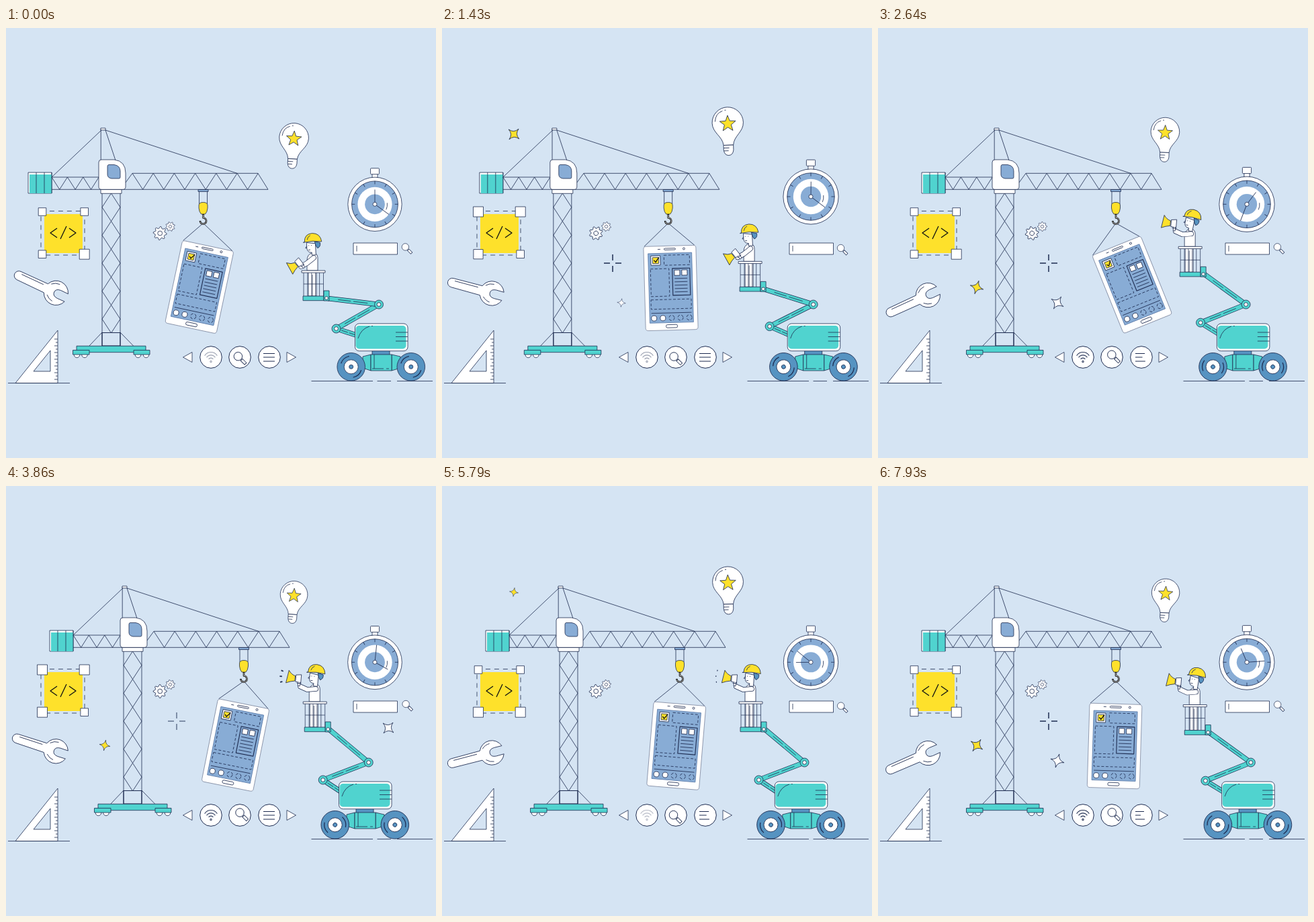
Recreate the animation shown at these times as an HTML page. Size 640 by 640 pixels, loop 8 s.

```html
<!DOCTYPE html>
<html lang="en">
<head>
<meta charset="utf-8">
<title>App construction</title>
<style>
html, body { margin: 0; width: 100%; height: 100%; overflow: hidden; background: #d5e4f3; }
svg { display: block; width: 100vw; height: 100vh; }
.l { fill: none; }
.w { fill: #fff; }
.y { fill: #fee12b; }
.t { fill: #50d3cf; }
.b { fill: #88acd5; }
.d { fill: #5693c1; }
.n { stroke: none; }
.dash { fill: none; stroke-dasharray: 4 2.6; }
</style>
</head>
<body>
<svg id="stage" viewBox="0 0 640 640" stroke="#1d2b50" stroke-width=".8" stroke-linejoin="round"></svg>
<script>
const LOOP = 8000, CYCLE = 5000;
const stage = document.getElementById('stage');

// ---- markup helpers ----
const path = (d, c = 'l', more = '') => `<path d="${d}" class="${c}" ${more}/>`;
const rect = (x, y, w, h, c = 'l', r = 0, more = '') =>
  `<rect x="${x}" y="${y}" width="${w}" height="${h}" rx="${r}" class="${c}" ${more}/>`;
const disc = (x, y, r, c = 'l', more = '') => `<circle cx="${x}" cy="${y}" r="${r}" class="${c}" ${more}/>`;
const group = (id, inner, more = '') => `<g id="${id}" ${more}>${inner}</g>`;
const range = (n, f) => Array.from({ length: n }, (_, i) => f(i));
const zigzag = (n, f) => 'M' + range(n, f).join('L');
const polar = (r, a) => [r * Math.sin(a), -r * Math.cos(a)].map(v => v.toFixed(2));

const gear = (r, inner, hole) => {
  const pts = range(32, i => polar(i % 4 < 2 ? r : inner, (i + (i % 2 ? -.15 : .15)) * Math.PI / 16));
  return path(`M${pts.join('L')}Z`, 'w') + disc(0, 0, hole, 'w');
};
const star = r => 'M' + range(10, i => polar(i % 2 ? r * .42 : r, i * Math.PI / 5)).join('L') + 'Z';
const SPARK = 'M0-10.5Q1-1 10.5 0Q1 1 0 10.5Q-1 1-10.5 0Q-1-1 0-10.5Z';

// ---- parts ----
const code = rect(57, 277, 57, 58, 'y n') +
  rect(52, 272.5, 65, 65.5, 'l', 0, 'stroke-dasharray="7 5.95"') +
  path('M76 298L66 305L76 312M81 314L90 295M94 298L104 305L94 312', 'l', 'stroke-width="1.3" stroke="#111"') +
  range(4, i => `<rect id="handle${i}" class="w"/>`).join('');

const wrench = path('M13-6.3A18 18 0 0 0-20.5-7.2L-65-6.8A6.8 6.8 0 0 0-65 6.8L-20.5 7.2A18 18 0 0 0 13 6.3L1 6.5Q-7 6-7 0Q-7-6 1-6.5Z', 'w') +
  path('M-62-3.5H-26M-16-9Q-11-14-4-14M-15 8Q-10 13-4 13.5');

const square = path('M14 528.5L77 450V528.5ZM41 511H66V480Z', 'w', 'fill-rule="evenodd"') +
  path('M3 528.5H95') + path(range(13, i => `M77 ${463 + i * 5}h${i % 2 ? -3 : -5}`).join(''));

const crane =
  rect(33, 215, 35, 31, 'w') + rect(35, 218, 33, 28, 't n') + path('M45 215V246M57 215V246M68 215V246') +
  path('M68 222H138M68 240.3H390L375 216.3H188L178 230M142 152L68 222M141.2 150V197M148 152L163 197M148 152L344 216.3') +
  path(zigzag(7, i => [68 + i * 11.7, i % 2 ? 240.3 : 222])) +
  path(zigzag(13, i => [188 + i * 15.6, i % 2 ? 240.3 : 216.3])) +
  rect(141, 149, 7, 3, 'w') +
  path('M143 246V473M170 246V473M143 453L124 473M170 453L189.5 473') +
  [13.5, -13.5].map(s => path(zigzag(11, i => [156.5 + [0, s, 0, -s][i % 4], 246 + i * 20.8]))).join('') +
  rect(143, 453.5, 27, 19.5, 'l', 0, 'stroke-width="1.1"') +
  [105.5, 117, 196.5, 208.5].map(x => disc(x, 486.5, 4.2, 'w')).join('') +
  rect(105, 473.3, 103, 9.4, 't') + rect(99.5, 479.5, 24.5, 6.5, 't') + rect(190, 479.5, 24, 6.5, 't') +
  rect(141, 240.3, 31, 6, 'w') +
  path('M142 196H161Q178 198 178 216V236Q178 240.3 174 240.3H142Q138 240.3 138 236V200Q138 196 142 196Z', 'w') +
  path('M153 203.5H161Q170 205 170 213V222Q170 224 168 224H157Q151 223 151 218V206Q151 203.5 153 203.5Z', 'b');

const hook = rect(-7.5, 240.5, 15, 3, 'b') + path('M-6 243.5V262M6 243.5V262') +
  path('M-6.5 264Q-6.5 259.5 0 259.5Q6.5 259.5 6.5 264V268Q6 274 3 277H-3Q-6 274-6.5 268Z', 'y') +
  path('M0 277V282.5A4.6 4.6 0 1 1-4.6 287', 'l', 'stroke="#111" stroke-width="2.6"') +
  path('M0 278V282.5A4.6 4.6 0 1 1-4.4 288', 'l', 'stroke="#fff" stroke-width=".7"');

const phone = rect(-39, -62.7, 78, 125.4, 'w', 4, 'stroke="#7d879f"') +
  rect(-8.5, -59.2, 17, 2.4, 'w', 1.2) + disc(21, -58, 1.5, 'w') + path('M-18-58h4') +
  rect(-32.5, -52, 65, 103.5, 'b', 0, 'stroke="#5878a8"') + rect(-8.5, 54.5, 17, 4.6, 'w', 2) +
  rect(-28.5, -48.5, 14, 14, 'w') + rect(-26, -46, 9, 9, 'y') +
  path('M-24-42L-21.5-39L-16.5-46', 'l', 'stroke="#111" stroke-width="1.3"') +
  rect(-9, -49, 38, 15, 'dash') + rect(-29.5, -29, 27.5, 41, 'dash') + rect(-30, 17, 60, 14, 'dash') +
  rect(3, -29, 26, 40, 'b', 0, 'stroke-width="1.1"') +
  rect(6, -26.5, 8, 8, 'w') + rect(17, -26.5, 8, 8, 'w') +
  path(range(5, i => `M6 ${-14 + i * 5}H25`).join('')) + path('M-30 37H30') +
  range(5, i => disc(-26 + i * 13.1, 44.5, 4, i < 2 ? 'w' : 'dash')).join('');

const bulb = path('M-7 32C-8 19-22.2 14-22.2 0A22.2 22.2 0 0 1 22.2 0C22.2 14 8 19 7 32Z', 'w') +
  path('M-7 32H7V39Q6 46.5 0 46.6Q-6 46.5-7 39ZM-7 36H1M-6.5 40H0', 'w') +
  path(star(12), 'y', 'transform="translate(0 1.5)"') + path('M-18-2Q-17-14-7-17M-4-18H-2');

const watch = rect(-4, -46, 8, 8, 'w') + rect(-6.5, -54, 13, 9, 'w', 1) + disc(0, 0, 40.5, 'w') +
  disc(0, 0, 34.7, 'b') + disc(0, 0, 25.8, 'w n') + disc(0, 0, 15, 'b n') +
  range(12, i => path('M0-34.7V-30', 'l', `transform="rotate(${i * 30})"`)).join('') +
  path('M18.5-2A18.5 18.5 0 0 1 17 8') +
  path('M0 0V-22', 'l', 'id="handA"') + path('M0 0V-26', 'l', 'id="handB"') + disc(0, 0, 3, 'w');

const loupe = path('M4 4L9.5 9.5', 'l', 'stroke-width="4"') + path('M4.6 4.6L9 9', 'l', 'stroke="#fff" stroke-width="2.6"') + disc(0, 0, 5.2, 'w');

const controls = path('M277 482.5V497.5L263.5 490ZM418 482.5V497.5L431.5 490Z', 'w') +
  [305, 348, 392].map(x => disc(x, 490, 16.3, 'w', 'stroke-width="1"')).join('') +
  group('wifi', [4, 7.5, 11].map(r => path(`M${305 - r * .85} ${496 - r * .75}A${r} ${r} 0 0 1 ${305 + r * .85} ${496 - r * .75}`)).join('') +
    disc(305, 496.5, 1.2), 'stroke-width="1.1"') +
  group('lens', loupe) + path('', 'l', 'id="menu" stroke-width="1.1"');

const wheel = id => group(id, disc(0, 0, 20.8, 'd') +
  path('M-15-5A16 16 0 0 1-3-15.7M15 5A16 16 0 0 1 3 15.7', 'l', 'stroke-width="1.2"') +
  disc(0, 0, 10.5, 'w') + disc(0, 0, 3, 'd'));

const truck = rect(545, 480, 26, 7, 'd') +
  path('M543 486L531 489V506L543 510ZM574 486L587 489V506L574 510Z', 't') + rect(543, 486, 31, 24, 't') +
  path('M545 507H562M566 507H570M548 486V507') +
  rect(519.5, 440, 78.5, 40.7, 'w', 6) + rect(520.5, 443, 75, 34.5, 't n', 5) +
  path('M580 453H598M580 459.5H598M580 466H598M524 462Q528 448 541 444M544 443.5H546') +
  wheel('wheelL') + wheel('wheelR');

const tube = (id, color, more = '') => path('', 'l', `id="${id}" stroke-width="7.6" ${more}`) +
  path('', 'l', `id="${id}Fill" stroke="${color}" stroke-width="6.2" ${more}`);
const arm = id => tube(id, '#50d3cf') + path('', 'l', `id="${id}Line"`);
const joint = id => group(id, disc(0, 0, 6.5, 't') + disc(0, 0, 2.8, 'w'));

const basket =
  rect(10, 2, 12, 36, 'w') + path('M16 6V38') +
  group('torso', path('M8 0V-14Q8-24 15-26H19Q24-25 24-18V0Z', 'w') +
    group('head', path('M8-42V-33Q9-27 15-27V-23H21V-40Z', 'w') + path('M20-43L28-41Q29-35 24-33Q21-36 20-43Z', 'd') +
      path('M11-38V-37M15-38V-37M8-37L6-34H8M10-31H13') +
      path('M5-43Q5-55 17-55.5Q29-55 30.5-42.5Q17-45 3-42.5Z', 'y') + path('M9-46Q10-51 14-52.5'))) +
  tube('sleeve', '#fff', 'stroke-linecap="round"') +
  group('horn', path('M4-6L-4-5V5L4 6Z', 'w') + path('M-5-3.5Q-11-5-15-11L-18 8Q-12 5-5 4Z', 'y') +
    path('M0 6V11H3V5M-2 7H5', 'w') + path('', 'l', 'id="sound" stroke-width="1.8"')) +
  path(range(6, i => `M${3 + i * 5.9} 3V38`).join('') + 'M3 20H32.5', 'l', 'stroke-width=".7"') +
  rect(0, 0, 35, 3.2, 'w') + rect(2, 38, 31, 6.7, 't') + rect(33, 30, 8, 15, 't') + disc(37, 41, 2.4, 'w');

const sparks = [
  { x: 107, y: 158, c: 'y', from: 500, to: 2400 },
  { x: 147, y: 386, c: 'y', from: 2200, to: 4200 },
  { x: 267, y: 409, c: 'w', from: 1150, to: 3400 },
  { x: 569, y: 360, c: 'w', from: 3100, to: 4700 }
];

stage.innerHTML = square + group('wrench', wrench) + code +
  group('gearA', gear(10, 7.3, 3.4)) + group('gearB', gear(7, 5.1, 2.3), 'stroke-width=".6"') +
  group('crane', crane) + path('', 'l', 'id="rope"') + group('phone', phone) + group('hook', hook) +
  path('M241 350H250M258 350H267M254 337V346M254 354V363', 'l', 'id="cross" stroke-width="1.5"') +
  sparks.map((s, i) => path(SPARK, s.c, `id="spark${i}"`)).join('') +
  group('bulb', bulb) + group('watch', watch) +
  rect(517, 320, 65.5, 17, 'w') + path('M522 324V332.5') + group('search', loupe, 'stroke-width=".7"') + controls +
  path('M454.5 525.5H546M552.5 525.5H573M582 525.5H635') +
  arm('base') + group('truck', truck) + arm('lower') + arm('upper') + joint('jointL') + joint('jointU') + group('basket', basket);

const el = {};
stage.querySelectorAll('[id]').forEach(e => el[e.id] = e);
const set = (id, o) => { for (const k in o) el[id].setAttribute(k, o[k]); };
const place = (id, x, y, turn = 0, size = 1) =>
  set(id, { transform: `translate(${x} ${y}) rotate(${turn}) scale(${size})` });

// ---- motion helpers ----
const clamp = v => Math.max(0, Math.min(1, v));
const ease = (t, from, to) => .5 - .5 * Math.cos(Math.PI * clamp((t - from) / (to - from)));
const wave = (t, peak, period = CYCLE) => Math.cos(2 * Math.PI * (t - peak) / period);
const show = (t, from, to) => ease(t, from, from + 500) * (1 - ease(t, to - 500, to));
// Repeating bump with a flat top.
function pulse(t, peak, period, reach) {
  const gap = Math.abs(((t - peak + 1.5 * period) % period) - period / 2) / reach;
  return gap < 1 ? Math.min(1, 3 * Math.cos(gap * Math.PI / 2) ** 2) : 0;
}

function drawCrane(t) {
  const STOP = 2640;
  const go = 1 - (1 - clamp(t / STOP)) ** 1.6;
  const x = 293.5 + 60.5 * go;
  const swings = (t - STOP) / 1080;
  const tilt = t < STOP ? 12 - 34 * ease(t, 500, STOP) : -22 * .6 ** swings * Math.cos(Math.PI * swings);
  const px = x - 1.1 * tilt + 7.5 * (1 - go), py = 387 - .01 * tilt * tilt;
  place('crane', 32 * go, 0);
  place('hook', x, 0);
  place('phone', px, py, tilt);
  const a = tilt * Math.PI / 180, c = Math.cos(a), s = Math.sin(a);
  const corner = k => [px + k * c + 62.7 * s, py + k * s - 62.7 * c];
  set('rope', { d: `M${corner(-38)}L${x} 290.5L${corner(37)}` });
}

function drawTube(id, d) {
  set(id, { d });
  set(id + 'Fill', { d });
}

function drawArm(id, x1, y1, x2, y2) {
  const mix = k => `${x1 + (x2 - x1) * k} ${y1 + (y2 - y1) * k}`;
  drawTube(id, `M${mix(0)}L${mix(1)}`);
  set(id + 'Line', { d: `M${mix(.2)}L${mix(.45)}M${mix(.5)}L${mix(.78)}` });
}

function drawLift(t) {
  const dx = -13.3 * (1 + wave(t, 4850, 9700));
  const k = ease(t, 200, 3300) - ease(t, 7250, 10350);
  const raise = ease(t, 1430, 2500);
  const ux = 555 + 8.7 * k + dx, uy = 411.5, lx = 491.5 + 4.2 * k + dx, ly = 447.5 - 10 * k;
  const bx = 477 + 15 * k + 11.2 * k * k + dx, by = 402 - 40 * k;
  const roll = dx / 20.8 * 180 / Math.PI;
  place('truck', dx, 0);
  place('wheelL', 513.7, 504.3, roll);
  place('wheelR', 602.8, 504.3, roll);
  drawArm('base', lx, ly, 530 + dx, 460);
  drawArm('lower', lx, ly, ux, uy);
  drawArm('upper', bx + 2, by + .5, ux, uy);
  place('jointL', lx, ly);
  place('jointU', ux, uy);
  place('basket', bx - 37, by - 41);

  const nod = raise * (9 + 5 * wave(t, 2640, 4600));
  const hx = -4 - 3 * raise, hy = -12 - 22.5 * raise;
  place('torso', raise, 0);
  set('head', { transform: `rotate(${nod - 3} 17 -30)` });
  drawTube('sleeve', `M${18 + raise} -19L${8 - 2 * raise} ${-11 - 7 * raise}L${hx + 3} ${hy + 6 + 6 * raise}`);
  place('horn', hx, hy, -38 + 43 * raise);

  const p = ((t - 3250 + 880) % 880) / 880;
  const on = t > 3000 && t < 7650;
  const from = 20 + 7 * clamp((p - .3) / .6), to = 20 + 8 * clamp(p / .2);
  const ray = a => `M${-from * Math.cos(a)} ${-1 + from * Math.sin(a)}L${-to * Math.cos(a)} ${-1 + to * Math.sin(a)}`;
  set('sound', { d: on ? ray(-.32) + ray(0) + ray(.32) : '' });
}

function drawBulb(t) {
  const low = 13.2 * (1 - wave(t, 1560, 3850));
  const size = (46.5 - .238 * low + 3 * (1 - ease(t, 0, 1430))) / 44.5;
  place('bulb', 425.2 + .14 * low, 117.5 + low + 22.2 * size, -2 + .24 * low, size);
}

function drawWatch(t) {
  const spin = ease(t, 1250, 7700);
  place('watch', 549, 262.3 - 11.3 * pulse(t, 1680, CYCLE, 700), 0, 1.005 + .015 * wave(t, 2100));
  place('handA', 0, 0, 337 * spin);
  place('handB', 0, 0, 126 + 680 * spin);
}

function drawHandles(t) {
  [1600, 1700, 1000, 400].forEach((peak, i) => {
    const s = 11.6 + 3.4 * pulse(t, peak, CYCLE / 2, 650);
    const x = i % 2 ? 116.7 : 54, y = i < 2 ? 273.5 : 336.7;
    set('handle' + i, { x: x - s / 2, y: y - s / 2, width: s, height: s });
  });
}

function drawSmall(t) {
  const c = t % CYCLE;
  const rock = wave(t, 260, CYCLE / 3);
  const start = ease(t, 900, 2400);
  place('wrench', 78, 396, 25 * (1 - start + start * rock * (1.5 - .5 * rock * rock)));
  place('gearA', 229.2, 305.5, t * .045);
  place('gearB', 244.5, 295.5, 22 - t * .045);
  set('cross', { opacity: show(c, 800, 4150) });
  sparks.forEach((s, i) => {
    const life = clamp((c - s.from) / (s.to - s.from));
    place('spark' + i, s.x, s.y, 42 * Math.sin(Math.PI * life) ** 2, show(c, s.from, s.to));
  });
  set('wifi', { opacity: .66 + .34 * wave(t, 3200) });
  const look = wave(t, 3300);
  place('lens', 346.5 + 2 * look, 487.6 - 2 * look, 0, 1.2);
  place('search', 594.3 - .8 * wave(t, 1300), 326 + 1.5 * wave(t, 1300));
  const k = 1 - pulse(t, 465, CYCLE / 2, 480);
  set('menu', { d: `M383 484.5h${13 + 4 * k}M383 490h${8 + 9 * k}M383 496h${14 + 3 * k}` });
}

function draw(t) {
  [drawCrane, drawLift, drawBulb, drawWatch, drawHandles, drawSmall].forEach(f => f(t));
}

const start = performance.now();
function tick() {
  draw((performance.now() - start) % LOOP);
  requestAnimationFrame(tick);
}
tick();
</script>
</body>
</html>
```
